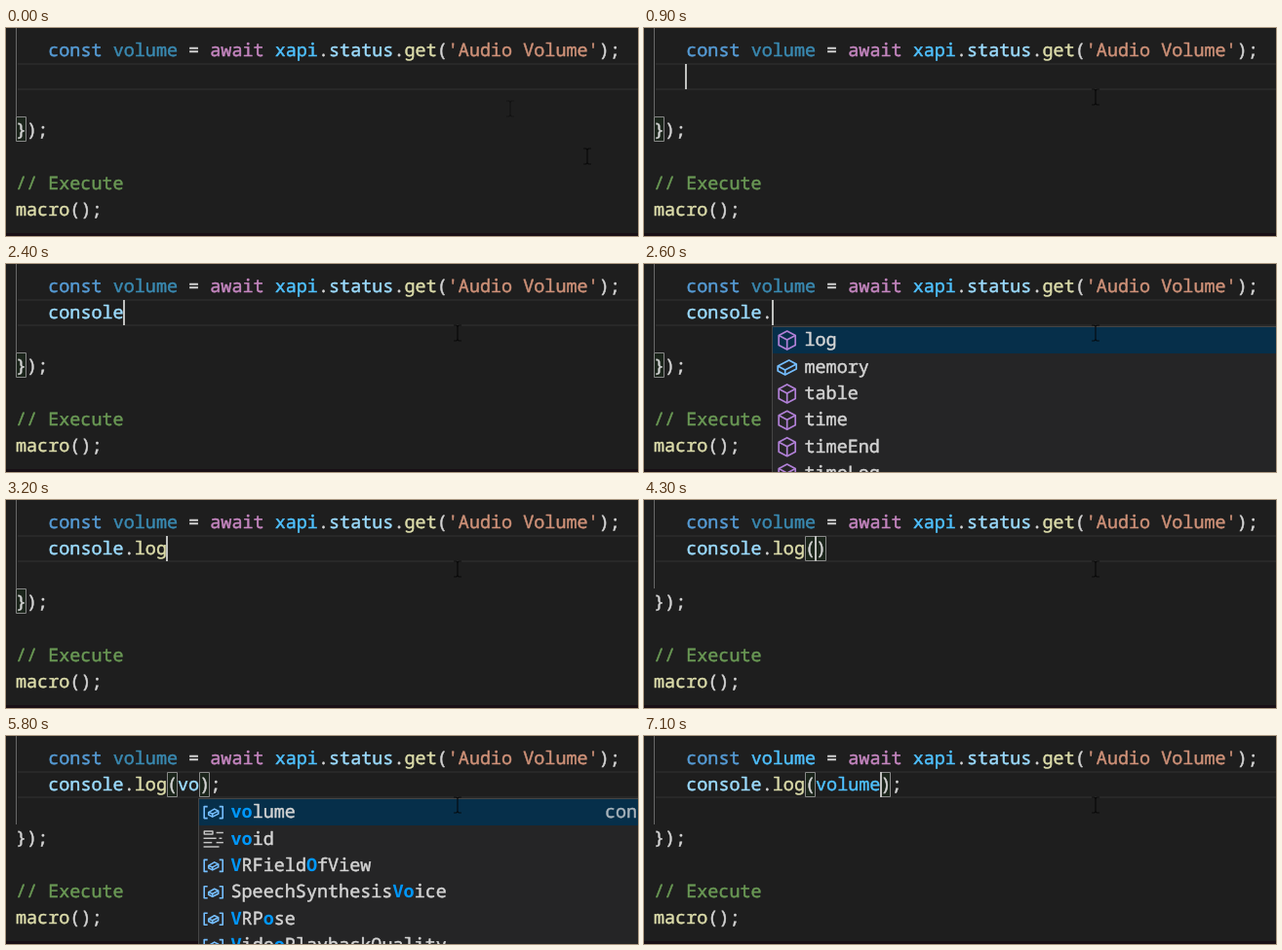
An HTML page with a canvas for the animation above (7.2 s loop, 648 px wide and 214 px high).

```html
<!DOCTYPE html>
<html lang="en">
<head>
<meta charset="utf-8">
<title>Editor typing</title>
<style>
html, body { margin: 0; width: 648px; height: 214px; overflow: hidden; background: #1e1e1e; }
canvas { display: block; }
</style>
</head>
<body>
<canvas id="stage" width="648" height="214"></canvas>
<script>
const ctx = document.getElementById('stage').getContext('2d');
const LOOP = 7200, W = 648, H = 214;
const CH = 11.07, ROW = 27.4, LEFT = 10, INDENT = 3;
const FONT = '18.45px "Noto Sans Mono", "DejaVu Sans Mono", monospace';
const C = {
  bg: '#1e1e1e', text: '#d4d4d4', key: '#569cd6', constant: '#4fc1ff', unused: '#3a8ab2',
  flow: '#c586c0', prop: '#9cdcfe', func: '#dcdcaa', str: '#ce9178', note: '#6a9955',
  popup: '#252526', chosen: '#062f4a', match: '#0097fb', blue: '#75beff', purple: '#b180d7'
};

const col = n => LEFT + n * CH;
const baseline = line => 28.6 + line * ROW;

function rect(x, y, w, h, color) {
  ctx.fillStyle = color;
  ctx.fillRect(x, y, w, h);
}

// A hairline outline gives plain text its slightly heavy look.
function write(x, y, str, color, bold) {
  ctx.font = (bold ? 'bold ' : '') + FONT;
  ctx.fillStyle = ctx.strokeStyle = color;
  ctx.fillText(str, x, y);
  if (bold) return;
  ctx.lineWidth = 0.45;
  ctx.strokeText(str, x, y);
}

// Tokens are alternating text and colour.
function codeLine(line, start, ...tokens) {
  for (let i = 0; i < tokens.length; i += 2) {
    write(col(start), baseline(line), tokens[i], tokens[i + 1]);
    start += tokens[i].length;
  }
}

function poly(points, closed) {
  ctx.beginPath();
  points.forEach(([x, y]) => ctx.lineTo(x, y));
  if (closed) ctx.closePath();
  ctx.stroke();
}

const icons = {
  variable() {
    ctx.strokeStyle = C.blue;
    ctx.lineWidth = 1.6;
    poly([[-6, -6], [-9.5, -6], [-9.5, 6], [-6, 6]]);
    poly([[6, -6], [9.5, -6], [9.5, 6], [6, 6]]);
    poly([[-5, 0], [1, -3.5], [5, -1.5], [5, 1.5], [-1, 4.5], [-5, 2.5]], true);
    poly([[-5, 0], [-1, 1.5], [5, -1.5]]);
    poly([[-1, 1.5], [-1, 4.5]]);
  },
  keyword() {
    ctx.scale(1.45, 1.45);
    ctx.strokeStyle = '#c5c5c5';
    ctx.lineWidth = 1;
    ctx.strokeRect(-6.5, -5.5, 6, 2);
    const bars = [[2, -5, 5], [-7, -1, 9], [4, -1, 2], [-7, 2, 6], [2, 2, 5], [-7, 5, 11]];
    for (const [x, y, w] of bars) rect(x, y, w, 1, '#c5c5c5');
  },
  method() {
    ctx.strokeStyle = C.purple;
    ctx.lineWidth = 1.7;
    poly([[0, -9.5], [8.5, -5], [8.5, 5], [0, 9.5], [-8.5, 5], [-8.5, -5]], true);
    poly([[-8.5, -5], [0, -0.5], [8.5, -5]]);
    poly([[0, -0.5], [0, 9.5]]);
  },
  field() {
    ctx.strokeStyle = C.blue;
    ctx.lineWidth = 1.7;
    poly([[-9.5, -1], [2, -7], [9.5, -3], [9.5, 2], [-2, 8], [-9.5, 4]], true);
    poly([[-9.5, -1], [-2, 3], [9.5, -3]]);
    poly([[-2, 3], [-2, 8]]);
  }
};

// Each entry: label, icon, matched character positions.
const lists = {
  co: [
    ['console', 'variable', [0, 1]],
    ['const', 'keyword', [0, 1]],
    ['continue', 'keyword', [0, 1]],
    ['Comment', 'variable', [0, 1]],
    ['CompositionEvent', 'variable', [0, 1]],
    ['ConstantSourceNode', 'variable', [0, 1]]
  ],
  members: [
    ['log', 'method', []],
    ['memory', 'field', []],
    ['table', 'method', []],
    ['time', 'method', []],
    ['timeEnd', 'method', []],
    ['timeLog', 'method', []]
  ],
  vo: [
    ['volume', 'variable', [0, 1]],
    ['void', 'keyword', [0, 1]],
    ['VRFieldOfView', 'variable', [0, 7]],
    ['SpeechSynthesisVoice', 'variable', [15, 16]],
    ['VRPose', 'variable', [0, 3]],
    ['VideoPlaybackQuality', 'variable', [0, 4]]
  ]
};

// Editor states: start time, typed text, caret column, then optional popup and match length.
const states = [
  [0, '', 0],
  [1500, 'c', 1, 'co', 1],
  [1600, 'co', 2, 'co', 2],
  [2400, 'console', 7],
  [2500, 'console.', 8, 'members', 0],
  [2900, 'console.log', 11],
  [3700, 'console.log()', 12],
  [4500, 'console.log()', 13],
  [4700, 'console.log();', 14],
  [4900, 'console.log();', 13],
  [5100, 'console.log();', 12],
  [5200, 'console.log(v);', 13],
  [5300, 'console.log(vo);', 14, 'vo', 2],
  [6200, 'console.log(volume);', 18]
];

const caretOff = [[0, 800], [1300, 1500], [2100, 2400], [3400, 3700], [4100, 4300], [5800, 6200], [6700, 7050]];

function typedColor(word) {
  if (word === 'log') return C.func;
  if (word === 'volume') return C.constant;
  return /^\w/.test(word) ? C.prop : C.text;
}

function bracketBox(x, y, w) {
  rect(x, y, w, 26, 'rgba(0,100,0,.1)');
  ctx.strokeStyle = '#888';
  ctx.lineWidth = 1;
  ctx.strokeRect(x + 0.5, y + 0.5, w - 1, 25);
}

function drawPopup(x, name, matched) {
  rect(x, 64, W - x, H - 64, '#454545');
  rect(x + 1, 65, W - x, H - 65, C.popup);
  rect(x + 1, 65, W - x, 27, C.chosen);
  lists[name].forEach(([label, icon, hits], i) => {
    const mid = 78.6 + i * ROW, y = baseline(2 + i) + 0.8;
    ctx.save();
    ctx.translate(x + 15.7, mid);
    icons[icon]();
    ctx.restore();
    const on = hits.slice(0, matched);
    let from = 0;
    while (from < label.length) {
      const hit = on.includes(from);
      let to = from + 1;
      while (to < label.length && on.includes(to) === hit) to++;
      write(x + 33.5 + from * CH, y, label.slice(from, to), hit ? C.match : C.text, hit);
      from = to;
    }
  });
  if (name === 'vo') write(614, baseline(2) + 0.8, 'const', '#a9b4bc');
}

function drawPointer(x, y, alpha) {
  ctx.globalAlpha = alpha;
  ctx.strokeStyle = '#050505';
  ctx.lineWidth = 1.2;
  poly([[x, y - 7], [x, y + 7]]);
  for (const s of [-1, 1]) poly([[x - 4, y + 8 * s], [x - 1.5, y + 8 * s], [x, y + 7 * s], [x + 1.5, y + 8 * s], [x + 4, y + 8 * s]]);
  ctx.globalAlpha = 1;
}

function pointerAt(t) {
  const path = [[596, 132], [517, 83], [480, 74], [463, 71]];
  const step = Math.min(t / 100, 3), i = Math.min(Math.floor(step), 2), k = step - i;
  return [0, 1].map(a => path[i][a] + (path[i + 1][a] - path[i][a]) * k);
}

function draw(t) {
  const [, typed, caret, list, matched] = states.filter(s => s[0] <= t).pop();
  const open = typed.indexOf('('), close = typed.indexOf(')');
  const atBracket = open >= 0 && (caret === open + 1 || caret === close || caret === close + 1);
  const inCall = open >= 0 && caret > open && caret <= close + 1;
  const caretX = col(INDENT + caret);

  rect(0, 0, W, H, C.bg);
  rect(12, 36, W, 2, '#282828');
  rect(12, 62, W, 2, '#282828');
  rect(10, 0, 1, 91, '#686868');
  rect(0, 211, W, 3, '#190f15');

  if (atBracket) {
    for (const at of [open, close]) bracketBox(Math.round(col(INDENT + at)), 37, 11);
  } else if (!inCall) {
    bracketBox(10, 91, 11);
  }

  codeLine(0, INDENT,
    'const ', C.key, 'volume', t < 6400 ? C.unused : C.constant, ' = ', C.text, 'await ', C.flow,
    'xapi', C.constant, '.', C.text, 'status', C.prop, '.', C.text, 'get', C.func, '(', C.text,
    "'Audio Volume'", C.str, ');', C.text);
  const words = typed.match(/\w+|\W/g) || [];
  codeLine(1, INDENT, ...words.flatMap(w => [w, typedColor(w)]));
  codeLine(3, 0, '});', C.text);
  codeLine(5, 0, '// Execute', C.note);
  codeLine(6, 0, 'macro', C.func, '();', C.text);

  const edge = Math.floor(caretX - 0.4);
  if (!caretOff.some(([a, b]) => t >= a && t < b)) rect(edge, 37, 2, 26, '#c0c1bf');
  if (list) drawPopup(edge, list, matched);

  if (t < 100) drawPointer(517, 83, 0.4);
  drawPointer(...pointerAt(t < 100 ? 0 : t), 0.8);
}

ctx.textRendering = 'geometricPrecision';
ctx.textBaseline = 'alphabetic';
ctx.lineJoin = 'round';
const began = performance.now();
function tick() {
  draw((performance.now() - began) % LOOP);
  requestAnimationFrame(tick);
}
tick();
</script>
</body>
</html>
```
